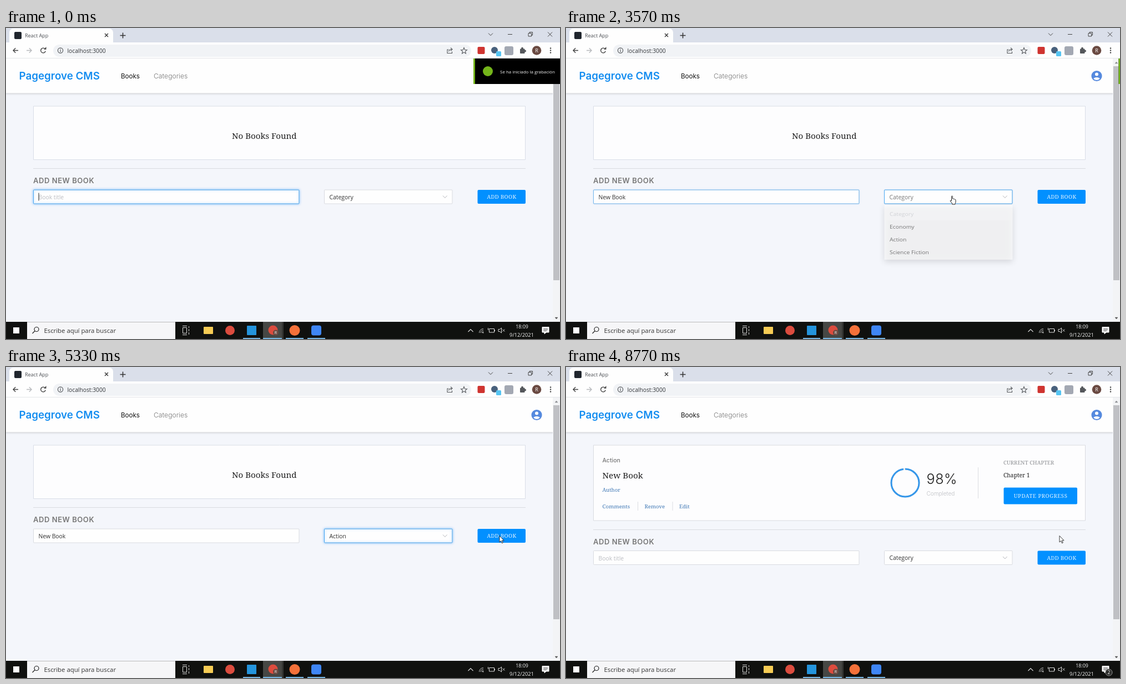
Write an HTML page with a canvas that moves like this. It is 998x561 px and loops after 8810 ms.

```html
<!DOCTYPE html>
<html lang="en">
<head>
<meta charset="utf-8">
<title>Book list</title>
<style>
  html, body { margin: 0; width: 100%; height: 100%; overflow: hidden; background: #f4f6fb; }
  canvas { display: block; width: 998px; height: 561px; }
</style>
</head>
<body>
<canvas id="stage" width="998" height="561"></canvas>
<script>
const ctx = document.getElementById('stage').getContext('2d');
const LOOP = 8810;
const UI = '"Open Sans", "Noto Sans", sans-serif';
const GEO = 'Inter, "Open Sans", sans-serif';
const SLAB = '"Noto Serif", "Liberation Serif", serif';
const BLUE = '#0290ff', INK = '#1f1f1f';

const clamp = v => Math.max(0, Math.min(1, v));
const span = (t, from, to) => clamp((t - from) / (to - from));
const easeOut = k => 1 - (1 - k) ** 4;
const easeIn = k => k ** 4;
const smooth = k => k * k * (3 - 2 * k);

function text(str, x, y, size, color, { font = UI, weight = 400, gap = 0, align = 'left' } = {}) {
  ctx.font = `${weight} ${size}px ${font}`;
  ctx.letterSpacing = gap + 'px';
  ctx.textAlign = align;
  ctx.textBaseline = 'alphabetic';
  ctx.fillStyle = color;
  ctx.fillText(str, x, y);
  const width = ctx.measureText(str).width;
  ctx.letterSpacing = '0px';
  return width;
}

function rect(x, y, w, h, color) {
  ctx.fillStyle = color;
  ctx.fillRect(x, y, w, h);
}

function box(x, y, w, h, r, fill, stroke) {
  ctx.beginPath();
  ctx.roundRect(x, y, w, h, r);
  if (fill) { ctx.fillStyle = fill; ctx.fill(); }
  if (stroke) { ctx.strokeStyle = stroke; ctx.lineWidth = 1; ctx.stroke(); }
}

function disc(x, y, r, color) {
  ctx.beginPath();
  ctx.arc(x, y, r, 0, 7);
  ctx.fillStyle = color;
  ctx.fill();
}

function ring(x, y, r, color, width = 1.2, from = 0, to = Math.PI * 2) {
  ctx.beginPath();
  ctx.arc(x, y, r, from, to);
  ctx.strokeStyle = color;
  ctx.lineWidth = width;
  ctx.stroke();
}

function pen(d, color, width = 1.2, fill) {
  const path = new Path2D(d);
  if (fill) { ctx.fillStyle = fill; ctx.fill(path); }
  ctx.strokeStyle = color;
  ctx.lineWidth = width;
  ctx.stroke(path);
}

function shadow(color, blur, y = 0) {
  ctx.shadowColor = color;
  ctx.shadowBlur = blur;
  ctx.shadowOffsetY = y;
}

function layer(draw) {
  ctx.save();
  draw();
  ctx.restore();
}

function browser() {
  rect(0, 0, 998, 28, '#dadfea');
  box(6, 1, 187, 32, [7, 7, 0, 0], '#fefefe');
  rect(0, 26, 998, 29, '#fefefe');
  box(15, 7, 13, 13, 2, '#20262d');
  text('React App', 34, 17, 9, '#4a4d52');
  pen('M178 10l6 6m0-6l-6 6', '#333', 1.3);
  pen('M205.500 13.500h10m-5-5v10', '#333', 1.5);
  pen('M869 9.500l4 4 4-4M904 11.500h8M941 9.500h5.500v5.500h-5.500zM943 9.500v-2h5.500v5.500h-2M976 7.500l8 8m0-8l-8 8', '#444', 1);

  box(85, 30, 753, 22, 11, '#f1f3f6');
  pen('M22 40.500h-9m4.200-4.200l-4.200 4.200 4.200 4.200', '#444', 1.4);
  pen('M37 40.500h9m-4.200-4.200l4.200 4.200-4.200 4.200', '#b8babd', 1.4);
  ring(67, 40.500, 4.300, '#444', 1.5, 0.3, 5.4);
  pen('M68.500 38.500h3.700v-4z', '#444', .5, '#444');
  ring(98, 40.500, 4.600, '#55585c');
  rect(97.400, 40, 1.300, 3, '#55585c');
  rect(97.400, 37.800, 1.300, 1.300, '#55585c');
  text('localhost:3000', 110.500, 44.500, 10.250, '#33363a');
  pen('M797.500 39h-2.500v6.500h8.500v-3M797.500 42.500c.5-3 3-4 6-4m-2.500-2.800l3 2.800-3 2.800', '#55585c', 1.1);
  pen('M825 35.500l1.500 3.700 4 .3-3 2.600.9 3.900-3.400-2.100-3.400 2.100.9-3.900-3-2.600 4-.3z', '#55585c', 1.1);
  box(849.500, 34, 13, 13, 2, '#cf3430');
  disc(880, 40, 6, '#48607c');
  box(883, 42, 9, 9, 1.500, '#55c4f2');
  box(898, 33, 16, 16, 3, '#a3a8b3');
  box(926, 37.500, 8.500, 8.500, 1, '#54575b');
  disc(930, 36.800, 2, '#54575b');
  disc(935, 41.600, 2, '#54575b');
  disc(956, 40.500, 8.300, '#6a4a42');
  text('R', 956, 44, 9, '#fff', { align: 'center' });
  for (const y of [36.500, 40.500, 44.500]) disc(981, y, 1.200, '#444');
  rect(0, 54, 998, 1, '#e4e6ea');
}

function header() {
  rect(0, 55, 986, 475, '#f4f6fb');
  layer(() => {
    shadow('rgba(0,0,0,.16)', 3, 1);
    rect(0, 55, 986, 62.500, '#fefefe');
  });
  rect(0, 53, 986, 2, '#fefefe');
  rect(0, 54, 998, 1, '#e4e6ea');
  text('Pagegrove CMS', 23.500, 93, 18.800, '#148df0', { font: GEO, weight: 600 });
  text('Books', 207, 90.500, 11.600, '#121212', { font: GEO });
  text('Categories', 266, 90.500, 12.200, '#777', { font: GEO, weight: 300 });
  disc(956, 86.500, 9.600, '#5589de');
  disc(956, 83.500, 3, '#fff');
  layer(() => {
    ctx.beginPath();
    ctx.arc(956, 86.500, 7.600, 0, 7);
    ctx.clip();
    ctx.beginPath();
    ctx.ellipse(956, 92.300, 6, 3.400, 0, 0, 7);
    ctx.fillStyle = '#fff';
    ctx.fill();
  });

  rect(985, 55, 13, 475, '#f3f4f6');
  rect(986, 69, 11, 386, '#bfc0c4');
  pen('M989 64l2.500-3 2.500 3z', '#8a8c90', .5, '#8a8c90');
  pen('M989 522l2.500 3 2.500-3z', '#555', .5, '#555');
}

function button(label, x, y, w, h, gap) {
  box(x, y, w, h, 2, BLUE);
  text(label, x + w / 2 + gap / 2, y + h / 2 + 3.600, 9.500, '#e9f5ff', { font: SLAB, gap, align: 'center' });
}

function emptyCard() {
  box(49.500, 141, 886, 96.500, 0, '#fdfdfe', '#d9dee7');
  text('No Books Found', 407, 200, 15.100, INK, { font: SLAB, weight: 500 });
}

function bookCard() {
  const slab = { font: SLAB };
  box(49.500, 141, 886, 136, 0, '#fdfdfe', '#d9dbe0');
  text('Action', 65.500, 172, 10.500, '#777', { font: GEO, weight: 500 });
  text('New Book', 65.500, 201, 15.200, INK, { font: SLAB, weight: 500 });
  text('Author', 65.500, 225, 9.600, '#3f78b5', slab);
  text('Comments', 65.500, 254.500, 9.800, '#3f78b5', slab);
  text('Remove', 141.500, 254.500, 9.600, '#3f78b5', slab);
  text('Edit', 204, 254.500, 9.800, '#3f78b5', slab);
  rect(129, 243, 1, 16, '#dcdee2');
  rect(191.500, 243, 1, 16, '#dcdee2');

  ring(611, 209, 25, '#e6e8ec', 3);
  ring(611, 209, 25, '#3597ea', 3, -Math.PI / 2, Math.PI * 1.46);
  text('98%', 649.500, 210.500, 25, INK, { font: GEO, weight: 300, gap: .6 });
  text('Completed', 649.500, 232, 10, '#bcbec2', { font: GEO, weight: 300 });
  rect(742, 181, 1, 56, '#dcdee2');
  text('CURRENT CHAPTER', 788, 176, 9.400, '#8a8c90', { font: SLAB, weight: 300, gap: .15 });
  text('Chapter 1', 788, 198.500, 10.300, INK, slab);
  button('UPDATE PROGRESS', 788.500, 217.500, 132.500, 30, .6);
}

function field(x, w, y, focus, glow) {
  layer(() => {
    if (glow) shadow(`rgba(24,144,255,${.5 * glow})`, 4);
    box(x, y, w, 25, 1, '#fefefe', '#d9dbe0');
  });
  if (focus) layer(() => {
    ctx.globalAlpha = focus;
    box(x, y, w, 25, 1, null, '#4ba9f2');
  });
}

// Moments at which each letter of the title is entered
const KEYS = [615, 830, 1050, 1330, 1640, 1940, 2050, 2690];
const ADDED = 5500, OPEN = 3525, PICK = 4510;

function form(t) {
  const added = t >= ADDED;
  const dy = added ? 39.600 : 0;
  rect(49, 253 + Math.round(dy), 887, 1, '#d9dbe0');
  text('ADD NEW BOOK', 49, 280 + dy, 13, '#777', { font: GEO, weight: 600, gap: .55 });

  const y = 292 + Math.round(dy * 2) / 2;
  const blur = span(t, OPEN - 30, OPEN + 250);
  field(49.500, 478.500, y, added ? 0 : 1 - blur, added ? 0 : 1 - span(t, OPEN - 30, OPEN + 60));
  const typed = added ? '' : 'New Book'.slice(0, KEYS.filter(k => t >= k).length);
  const width = text(typed || 'Book title', 58.500, 309 + dy, 10.350, typed ? '#333' : '#bcbec3');
  if (t < OPEN - 30) rect(58.500 + (typed ? width : 0), 297.500, 1, 14, '#222');

  const hover = span(t, 3250, 3450);
  const fade = 1 - span(t, ADDED, ADDED + 170);
  field(573.500, 230.500, y, hover * fade, span(t, OPEN + 20, OPEN + 300) * fade);
  const open = t >= OPEN && t < PICK + 100;
  text(t >= PICK && !added ? 'Action' : 'Category', 582.500, 308.500 + dy, 10.400, open ? '#777' : '#333');
  pen(`M787 ${y + 10.500}l3.800 4 3.800-4`, '#b4b6ba', 1);
  button('ADD BOOK', 849.500, y, 86.500, 25, .4);
}

function dropdown(t) {
  const k = t < PICK + 20 ? easeOut(span(t, OPEN, OPEN + 200)) : 1 - easeIn(span(t, PICK + 20, PICK + 220));
  if (k <= 0) return;
  const y = pointer(t).y;
  layer(() => {
    ctx.globalAlpha = k;
    ctx.translate(0, 317);
    ctx.scale(1, .8 + .2 * k);
    ctx.translate(0, -317);
    layer(() => {
      shadow('rgba(0,0,0,.2)', 12, 4);
      box(573.500, 319.500, 231, 106, 1, '#fefefe');
    });
    ['Category', 'Economy', 'Action', 'Science Fiction'].forEach((name, i) => {
      const top = 324 + i * 24.700;
      const picked = i === 2 && t >= PICK;
      const under = y < 324 ? i === 0 : y >= top && y < top + 24.700;
      if (picked || under) rect(573.500, top, 231, 24.700, picked ? '#e6f6fb' : '#f5f5f6');
      text(name, 583, top + 16.500, 10.400, i ? '#333' : '#c0c2c6', { weight: picked ? 600 : 400 });
    });
  });
}

function message(t) {
  const gone = span(t, 8450, 8740);
  const k = t < 8000 ? easeOut(span(t, 5530, 5720)) : 1 - gone * gone;
  if (k <= 0) return;
  layer(() => {
    ctx.globalAlpha = k;
    ctx.translate(0, -36 * (1 - k));
    layer(() => {
      shadow('rgba(0,0,0,.18)', 12, 3);
      box(402, 68, 181, 33, 1.500, '#fefefe');
    });
    disc(420.500, 85, 6, '#46b81c');
    pen('M417.800 85l2 2 3.500-4', '#fff', 1.2);
    text('New book added: New Book', 433, 89, 10.450, '#333');
  });
}

function toast(t) {
  const k = span(t, 3194, 3574);
  if (k >= 1) return;
  const x = 842 + 156 * k * k;
  rect(x, 55, 156, 46, '#000');
  rect(x, 55, k ? 4 : 3, 46, '#74b51a');
  disc(x + 26, 78, 9, '#74b51a');
  text('Se ha iniciado la grabación', x + 48, 81.500, 8, '#f2f2f2');
}

function taskbar(t) {
  rect(0, 530, 998, 31, '#10110f');
  rect(13, 540, 11, 11, '#fff');
  rect(38, 530, 267, 31, '#f6f6f8');
  rect(38, 530, 267, 1, '#bbb');
  ring(55, 543.500, 4, '#222', 1.2);
  pen('M52 546.500l-4.500 4.500', '#222', 1.3);
  text('Escribe aquí para buscar', 68.500, 550, 11.350, '#333');

  pen('M318.500 540.500h7v10h-7zM318 537.500h8M318 553.500h8M329.500 538v3M329.500 543v4M329.500 549v4', '#ddd', 1);
  box(356, 539, 17, 13, 1, '#f6cc54');
  disc(403.500, 545.500, 8.500, '#dc4c3e');
  box(434, 537, 17, 17, 1, '#2494dc');
  rect(463, 530, 37, 31, '#464744');
  rect(497, 530, 3, 31, '#343532');
  disc(481, 545, 8.500, '#dc4c3e');
  disc(486, 549.500, 5, '#6a4a42');
  text('R', 486, 552.200, 7, '#fff', { align: 'center' });
  disc(520, 545.500, 9.500, '#f4713a');
  box(550, 536.500, 18, 18, 4, '#3f86f5');
  for (const [x, w] of [[427, 31], [463, 34], [504, 32], [543, 32]]) rect(x, 559, w, 2, '#76b4e0');

  pen('M832.500 548l4.500-4.500 4.500 4.500', '#ddd', 1.1);
  for (const r of [2.500, 5, 7.500]) ring(860, 550, r, '#bbb', 1, Math.PI, Math.PI * 1.5);
  disc(859.500, 549.500, 1, '#ddd');
  pen('M870.500 542.500h9v6.500h-9zM880.500 544.500v2.500M868.500 541v4', '#ddd', 1);
  pen('M887 543.500h2.500l3-2.500v9l-3-2.500h-2.500zM894.500 543.500l4 4m0-4l-4 4', '#ddd', 1);
  text('18:09', 929.500, 542, 8.800, '#f2f2f2', { align: 'center' });
  text('9/12/2021', 929, 556.500, 9.250, '#f2f2f2', { align: 'center' });
  pen('M966 539.500h12v9.500h-5l-3 3v-3h-4z', '#fff', 1, '#fff');
  pen('M968 542.500h8M968 544.500h8M968 546.500h6', '#222', .7);
  if (t >= 8600) {
    disc(978, 551, 6.500, '#2b2c2a');
    ring(978, 551, 6, '#aaa', .8);
    text('2', 978, 554.300, 8.500, '#fff', { align: 'center' });
  }
}

// Pointer stops: time, x, y
const STOPS = [
  [2670, 489, 420], [2870, 489, 420], [3350, 692, 302], [3680, 692, 302],
  [4320, 681, 374.500], [4640, 681, 374.500], [5260, 888.500, 304]
];

function pointer(t) {
  const i = STOPS.findIndex(s => s[0] > t);
  const [tb, xb, yb] = STOPS.at(i);
  if (i < 1) return { x: xb, y: yb };
  const [ta, xa, ya] = STOPS[i - 1];
  const k = smooth(span(t, ta, tb));
  return { x: xa + (xb - xa) * k, y: ya + (yb - ya) * k };
}

function cursor(t) {
  if (t < STOPS[0][0]) return;
  const { x, y } = pointer(t);
  const hand = t > 3200 && t < PICK && y < 425 && x > 573 && x < 805;
  layer(() => {
    ctx.translate(x, y);
    ctx.lineJoin = 'round';
    if (hand) {
      pen('M2.500 9V1.500Q3.400.2 4.400 1.500V6Q6 5.400 6.400 6.600Q8 6 8.400 7.200Q10 6.800 10 8.400V12Q9.800 13.500 9 14.500V16H3.800V14.500Q1.500 12 .2 9.800Q.6 8 2.500 9.500z', '#222', 1, '#fff');
    } else {
      pen('M.5.5V12L3.200 9.600 5 13.800 6.800 13 5 8.900H8.600z', '#222', .9, '#fff');
    }
  });
}

function frame(now) {
  const t = now % LOOP;
  header();
  browser();
  if (t < ADDED) emptyCard(); else bookCard();
  form(t);
  dropdown(t);
  message(t);
  toast(t);
  taskbar(t);
  cursor(t);
}

const start = performance.now();
function tick() {
  frame(performance.now() - start);
  requestAnimationFrame(tick);
}
tick();
</script>
</body>
</html>
```
